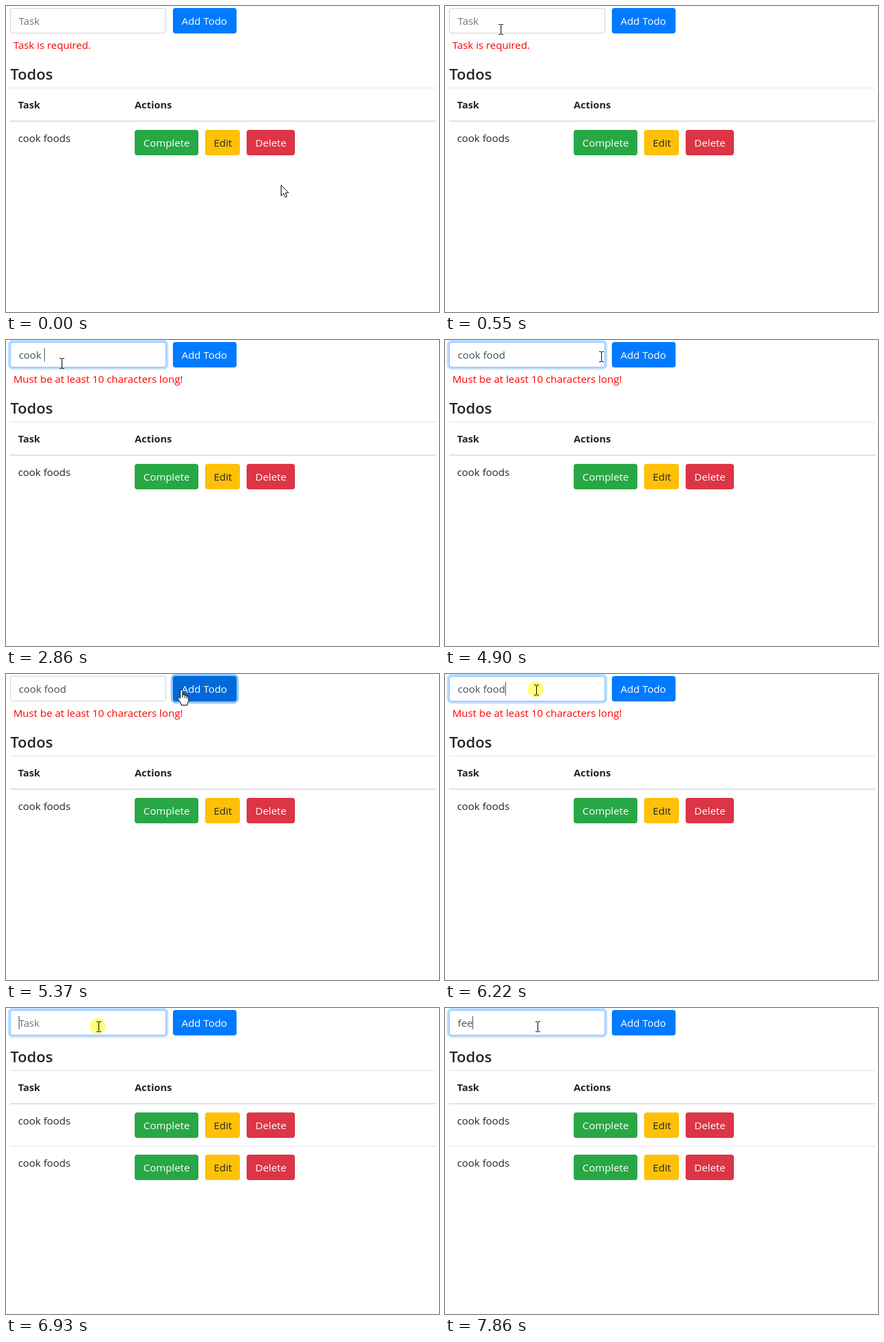
Animation, 646 px wide and 457 px high, one loop 8 s. Source, as an HTML page with a canvas:

```html
<!DOCTYPE html>
<html lang="en">
<head>
<meta charset="utf-8">
<title>Todo list</title>
<style>
  html, body { margin: 0; width: 100%; height: 100%; overflow: hidden; background: #fff; }
  canvas { display: block; width: 646px; height: 457px; }
</style>
</head>
<body>
<canvas id="stage"></canvas>
<script>
const W = 646, H = 457, LOOP = 8000, BLINK = 540;
const canvas = document.getElementById('stage');
const ctx = canvas.getContext('2d');
const dpr = window.devicePixelRatio || 1;
canvas.width = W * dpr;
canvas.height = H * dpr;

const FAMILY = '"Open Sans", "Noto Sans", sans-serif';
const BODY = '15.35px ' + FAMILY;
const BOLD = 'bold 14.9px ' + FAMILY;
const HEAD = '600 22.4px ' + FAMILY;

// Timed states: [start, value]
const typed = [
  [0, ''], [2100, 'c'], [2180, 'co'], [2400, 'coo'], [2480, 'cook'], [2860, 'cook '],
  [3720, 'cook f'], [3870, 'cook fo'], [4030, 'cook foo'], [4190, 'cook food'],
  [6300, 'cook foods'], [6690, ''], [7550, 'f'], [7710, 'fe'], [7860, 'fee']
];
const focus = [[0, ''], [1010, 'input'], [5210, 'add'], [6140, 'input'], [6540, 'add'], [6930, 'input']];
const errors = [[0, 'Task is required.'], [2100, 'Must be at least 10 characters long!'], [6300, '']];
const rowCount = [[0, 1], [6690, 2]];
const presses = [[1010, 1080], [5210, 5290], [6140, 6300], [6540, 6690], [6930, 7010]];

// Pointer moves: first step, last step, number of steps, end point
const home = [410, 267];
const moves = [
  [70, 390, 5, 74, 40], [470, 550, 2, 83.5, 35],
  [4500, 4900, 6, 233.5, 25], [4970, 5130, 3, 277, 25], [5290, 5290, 1, 277, 23],
  [5370, 5680, 5, 136.5, 24], [6380, 6540, 3, 316.5, 21.5], [6690, 6850, 3, 138.5, 28]
];

const entry = (list, t) => list.filter(e => e[0] <= t).pop();
const smooth = p => p * p * (3 - 2 * p);

function pointerAt(t) {
  let [x, y] = home;
  for (const [start, end, n, tx, ty] of moves) {
    if (t < start) break;
    const gap = n > 1 ? (end - start) / (n - 1) : 1;
    const step = Math.min(n, Math.floor((t - start) / gap + 0.001) + 1);
    const p = smooth(step / n);
    x += (tx - x) * p;
    y += (ty - y) * p;
  }
  return { x, y };
}

function box(x, y, w, h, r, fill) {
  ctx.beginPath();
  ctx.roundRect(x, y, w, h, r);
  ctx.fillStyle = fill;
  ctx.fill();
}

function text(str, x, y, color, font = BODY) {
  ctx.font = font;
  ctx.fillStyle = color;
  ctx.fillText(str, x, y);
}

function rule(y, h) {
  ctx.fillStyle = '#dee2e6';
  ctx.fillRect(6, y, 636, h);
}

const inside = (p, x, y, w, h) => p.x >= x && p.x < x + w && p.y >= y && p.y < y + h;

function button(label, x, y, w, color, hover, ink, p) {
  const over = inside(p, x, y, w, 38);
  if (over) p.shape = 'hand';
  box(x, y, w, 38, 4, over ? hover : color);
  text(label, x + 13, y + 25, ink);
}

function input(t, p) {
  const active = entry(focus, t)[1] === 'input';
  const [since, value] = entry(typed, t);
  if (inside(p, 6, 3, 233, 38)) p.shape = 'beam';
  if (active) box(2.8, -0.2, 239.4, 44.4, 7.2, '#bfdeff');
  box(6, 3, 233, 38, 4, active ? '#80bdff' : '#ced4da');
  box(7, 4, 231, 36, 3, '#fff');
  text(value || 'Task', 19, 28, value ? '#495057' : '#6c757d');
  const shown = t - Math.max(since, entry(focus, t)[0]);
  if (active && shown % (2 * BLINK) < BLINK) {
    const x = 19 + Math.round(ctx.measureText(value).width);
    ctx.fillStyle = '#495057';
    ctx.fillRect(x, 12, 1, 20);
  }
}

function addButton(t, p, pressed) {
  const active = entry(focus, t)[1] === 'add';
  if (active) box(245.8, -0.2, 101.4, 44.4, 7.2, '#93c7ff');
  const color = active ? (pressed ? '#0062cc' : '#0069d9') : '#007bff';
  button('Add Todo', 249, 3, 95, color, active ? color : '#0069d9', '#fff', p);
}

function table(top, rows, p) {
  text('Todos', 6.5, top + 17, '#212529', HEAD);
  rule(top + 29, 1);
  text('Task', 18, top + 60, '#212529', BOLD);
  text('Actions', 192, top + 60, '#212529', BOLD);
  rule(top + 78, 2);
  for (let i = 0; i < rows; i++) {
    const y = top + 92 + i * 63;
    if (i) rule(y - 13, 1);
    text('cook foods', 18, y + 18, '#212529');
    button('Complete', 192, y, 95, '#28a745', '#218838', '#fff', p);
    button('Edit', 297, y, 52, '#ffc107', '#e0a800', '#212529', p);
    button('Delete', 359, y, 72, '#dc3545', '#c82333', '#fff', p);
  }
}

const arrow = new Path2D('M.5 .5V16.5L4.2 13L6.7 18.6L9.2 17.5L6.8 12H11.6Z');
const hand = new Path2D('M-2 2Q-2 .5 -.2 .5Q1.6 .5 1.6 2V8Q4.6 6.8 5 9' +
  'Q7.6 8 8 10Q10.5 9.4 10.5 12V16Q10.5 18.5 8.6 20.5V23.5H-.8V21' +
  'L-5 15Q-6.6 12.6 -5 11.8Q-3.6 11.3 -2 13.5Z');

function pointer({ x, y, shape }) {
  ctx.save();
  ctx.translate(Math.floor(x), Math.floor(y));
  if (shape === 'beam') {
    ctx.fillStyle = '#000';
    ctx.fillRect(0, -7, 1, 14);
    for (const sy of [-8, 7]) {
      ctx.fillRect(-3, sy, 3, 1);
      ctx.fillRect(1, sy, 3, 1);
    }
  } else {
    const path = shape === 'hand' ? hand : arrow;
    ctx.fillStyle = '#fff';
    ctx.strokeStyle = '#000';
    ctx.lineWidth = 1;
    ctx.lineJoin = 'round';
    ctx.fill(path);
    ctx.stroke(path);
    if (shape === 'hand') {
      ctx.beginPath();
      for (const [fx, fy] of [[1.6, 8], [5, 9], [8, 10]]) {
        ctx.moveTo(fx, fy);
        ctx.lineTo(fx, fy + 4);
      }
      ctx.stroke();
    }
  }
  ctx.restore();
}

function draw(t) {
  ctx.setTransform(dpr, 0, 0, dpr, 0, 0);
  ctx.fillStyle = '#fff';
  ctx.fillRect(0, 0, W, H);

  const p = pointerAt(t);
  const pressed = presses.some(([a, b]) => t >= a && t < b);
  const error = entry(errors, t)[1];

  input(t, p);
  addButton(t, p, pressed);
  text(error, 11, 64, '#f00');
  table(error ? 93 : 64, entry(rowCount, t)[1], p);

  if (pressed) {
    ctx.beginPath();
    ctx.arc(p.x - 1.5, p.y - 1, 12, 0, Math.PI * 2);
    ctx.fillStyle = 'rgba(255, 255, 0, .5)';
    ctx.fill();
  }
  pointer(p);
}

const begin = performance.now();
function tick() {
  draw((performance.now() - begin) % LOOP);
  requestAnimationFrame(tick);
}
tick();
</script>
</body>
</html>
```
